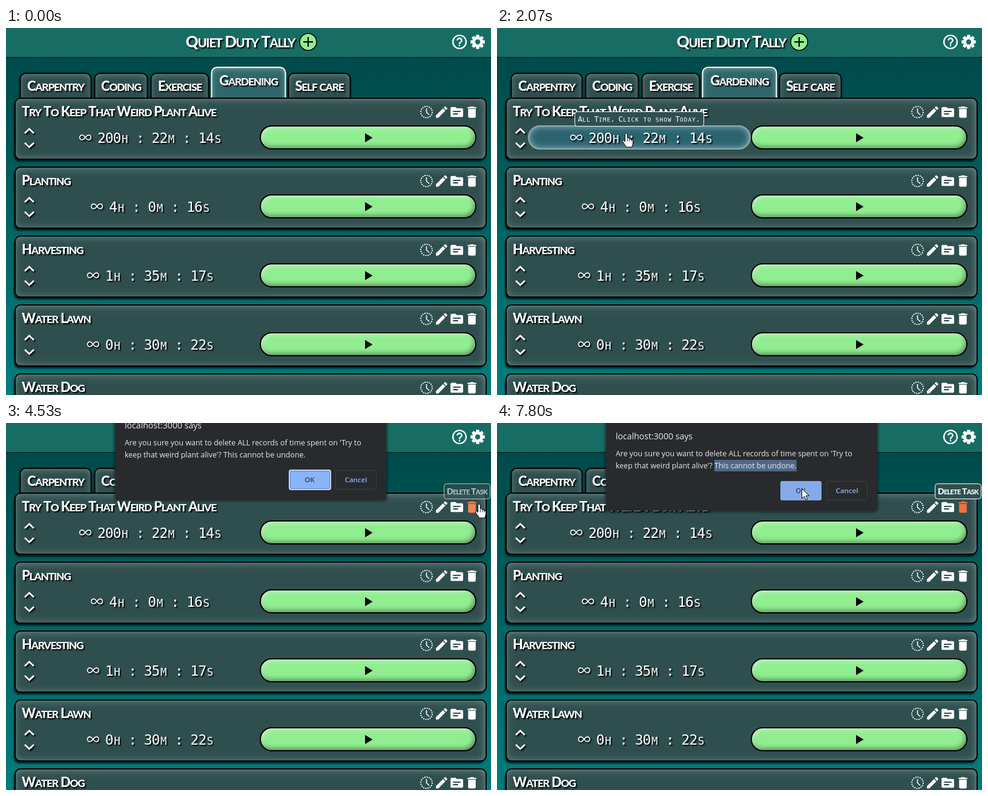
Write an HTML page with a canvas that moves like this. It is 801 px wide and 607 px high and loops after 8000 ms.

```html
<!DOCTYPE html>
<html lang="en">
<head>
<meta charset="utf-8">
<title>Task list</title>
<style>
html, body { margin: 0; width: 100%; height: 100%; overflow: hidden; background: #005c5c; }
canvas { display: block; }
</style>
</head>
<body>
<canvas id="stage" width="801" height="607"></canvas>
<script>
const ctx = document.getElementById('stage').getContext('2d');
const LOOP = 8000, STEP = 1000 / 15;
const SLATE = '#2f4f4f', GREEN = '#90ee90';
const SANS = '"Open Sans", "Noto Sans", sans-serif';

const tabs = [
  ['Carpentry', 22, 120], ['Coding', 145, 90], ['Exercise', 238, 98],
  ['Gardening', 338, 125], ['Self care', 465, 105]
];
const tasks = [
  ['Try To Keep That Weird Plant Alive', '200h : 22m : 14s'],
  ['Planting', '4h : 0m : 16s'],
  ['Harvesting', '1h : 35m : 17s'],
  ['Water Lawn', '0h : 30m : 22s'],
  ['Water Dog', '']
];

// Icons on a 24 unit grid
const icons = {
  help: new Path2D('M11 18h2v-2h-2v2zM12 2C6.48 2 2 6.48 2 12s4.48 10 10 10 10-4.48 10-10S17.52 2 12 2zm0 18c-4.41 0-8-3.59-8-8s3.59-8 8-8 8 3.59 8 8-3.59 8-8 8zm0-14c-2.21 0-4 1.79-4 4h2c0-1.1.9-2 2-2s2 .9 2 2c0 2-3 1.75-3 5h2c0-2.25 3-2.5 3-5 0-2.21-1.79-4-4-4z'),
  pencil: new Path2D('M3 17.25V21h3.75L17.81 9.94l-3.75-3.75L3 17.25zM20.71 7.04c.39-.39.39-1.02 0-1.41l-2.34-2.34c-.39-.39-1.02-.39-1.41 0l-1.83 1.83 3.75 3.75 1.83-1.83z'),
  folder: new Path2D('M20 6h-8l-2-2H4c-1.1 0-2 .9-2 2v12c0 1.1.9 2 2 2h16c1.1 0 2-.9 2-2V8c0-1.1-.9-2-2-2zM14 16H6v-2h8zM18 12H6v-2h12z'),
  trash: new Path2D('M6 19c0 1.1.9 2 2 2h8c1.1 0 2-.9 2-2V7H6v12zM19 4h-3.5l-1-1h-5l-1 1H5v2h14V4z')
};

const arrow = new Path2D('M0 0V16.5L4 12.8 6.6 18.6 9.2 17.5 6.7 11.8H12Z');
const hand = new Path2D('M-2 1.5C-2-.6 1.8-.6 1.8 1.5V7.5C4.2 6.6 5.5 7.6 5.5 9 7 8.4 8.4 9 8.5 10.3 10 10 11 11 11 12.5V16C11 18.5 9.5 19.5 9.5 22.5H-.5C-.5 20-2.5 18.5-4 16.5L-6 13C-6.5 11.3-4.5 10.6-3.4 12L-2 13.5Z');

// Pointer path: time, x, y and, where it changes, the shape
const track = [
  [130, 762, 478, 'arrow'], [470, 470, 345], [530, 400, 312, 'hand'],
  [660, 260, 268, 'arrow'], [800, 198.5, 219], [930, 207, 200], [1000, 228, 185, 'hand'],
  [1400, 430, 176], [1666, 408, 164], [2000, 408, 164], [2066, 213, 174],
  [2133, 202, 184], [2266, 220, 178], [2533, 220, 178], [2733, 392, 164],
  [2800, 392, 164], [3200, 600, 180], [3666, 730, 143], [3733, 758, 139],
  [3800, 783, 140, 'arrow'], [4070, 786, 405], [4400, 781, 134, 'hand'],
  [4866, 781, 134], [4933, 778, 138, 'arrow'], [5450, 330, 84, 'beam'], [5666, 269, 74],
  [5800, 269, 74], [5866, 274, 73], [6333, 361, 72], [6400, 361, 72],
  [7266, 500, 66], [7333, 500, 66], [7533, 502, 84, 'arrow'], [7800, 503, 108]
];

const clamp = v => Math.max(0, Math.min(1, v));
const pulse = (t, on, off, len) => clamp((t - on) / len) - clamp((t - off) / len);

function mix(a, b, p) {
  return `rgb(${a.map((v, i) => Math.round(v + (b[i] - v) * p))})`;
}

function shade(dx, dy, blur, color) {
  ctx.shadowOffsetX = dx;
  ctx.shadowOffsetY = dy;
  ctx.shadowBlur = blur;
  ctx.shadowColor = color;
}

function scoped(draw) {
  ctx.save();
  draw();
  ctx.restore();
}

function box(x, y, w, h, r, fill, line, width = 1) {
  ctx.beginPath();
  ctx.roundRect(x, y, w, h, r);
  if (fill) { ctx.fillStyle = fill; ctx.fill(); }
  if (line) { ctx.strokeStyle = line; ctx.lineWidth = width; ctx.stroke(); }
}

function inset(x, y, w, h, r, dx, dy, blur, color) {
  scoped(() => {
    ctx.beginPath();
    ctx.roundRect(x, y, w, h, r);
    ctx.clip();
    shade(dx, dy, blur, color);
    ctx.beginPath();
    ctx.rect(x - 40, y - 40, w + 80, h + 80);
    ctx.roundRect(x, y, w, h, r);
    ctx.fillStyle = '#000';
    ctx.fill('evenodd');
  });
}

function text(s, x, y, font, color, align = 'left') {
  ctx.font = font;
  ctx.fillStyle = color;
  ctx.textAlign = align;
  ctx.fillText(s, x, y);
}

// Small capitals; align 0 is left, .5 is centre
function caps(s, x, y, size, align = 0) {
  scoped(() => {
    ctx.letterSpacing = -size * .055 + 'px';
    const runs = s.match(/[a-z]+|[^a-z]+/g).map(run => {
      const font = `800 ${/[a-z]/.test(run) ? size * .79 : size}px Lato, sans-serif`;
      ctx.font = font;
      const up = run.toUpperCase();
      return [up, font, ctx.measureText(up).width];
    });
    x -= align * runs.reduce((sum, r) => sum + r[2], 0);
    for (const [run, font, w] of runs) {
      text(run, x, y, font, '#fff');
      x += w;
    }
  });
}

function mono(s, x, y, size, pitch) {
  [...s].forEach((c, i) => {
    const px = /[a-z]/.test(c) ? size * .76 : size;
    text(c.toUpperCase(), x + (i + .5) * pitch, y, `${px}px "DejaVu Sans Mono", monospace`, '#fff', 'center');
  });
}

function icon(name, cx, cy, size, color = '#fff') {
  scoped(() => {
    ctx.translate(cx - size / 2, cy - size / 2);
    ctx.scale(size / 24, size / 24);
    ctx.fillStyle = color;
    ctx.fill(icons[name], 'evenodd');
  });
}

function line(points, color, width) {
  ctx.beginPath();
  points.forEach(([x, y]) => ctx.lineTo(x, y));
  ctx.strokeStyle = color;
  ctx.lineWidth = width;
  ctx.stroke();
}

function clock(x, y) {
  scoped(() => {
    ctx.strokeStyle = '#fff';
    ctx.lineWidth = 1.8;
    for (let i = 0; i < 16; i++) {
      const a = i * Math.PI / 8;
      ctx.beginPath();
      ctx.arc(x, y, 9.4, a, a + .22);
      ctx.stroke();
    }
    line([[x, y - 6], [x, y + .5], [x + 4.5, y + 4.5]], '#fff', 1.6);
  });
}

function gear(x, y) {
  ctx.beginPath();
  for (let i = 0; i < 8; i++) {
    const a = i * Math.PI / 4;
    for (const [r, d] of [[8.6, -.36], [12, -.2], [12, .2], [8.6, .36]])
      ctx.lineTo(x + r * Math.cos(a + d), y + r * Math.sin(a + d));
  }
  ctx.closePath();
  ctx.moveTo(x + 4.2, y);
  ctx.arc(x, y, 4.2, 0, 7);
  ctx.fillStyle = '#fff';
  ctx.fill('evenodd');
}

function infinity(x, y) {
  const pts = [];
  for (let i = 0; i <= 60; i++) {
    const a = i * Math.PI / 30, k = 9.3 / (1 + Math.sin(a) ** 2);
    pts.push([x + k * Math.cos(a), y + 1.2 * k * Math.sin(a) * Math.cos(a)]);
  }
  line(pts, '#fff', 1.6);
}

function header() {
  const sky = ctx.createLinearGradient(0, 48, 0, 607);
  sky.addColorStop(0, '#004a4a');
  sky.addColorStop(1, '#007d7d');
  ctx.fillStyle = sky;
  ctx.fillRect(0, 0, 801, 607);
  ctx.fillStyle = '#176d64';
  ctx.fillRect(0, 0, 801, 48);
  ctx.fillStyle = '#001a1a';
  ctx.fillRect(0, 48, 801, 1);
  scoped(() => {
    shade(2, 2, 2, '#000');
    caps('Quiet Duty Tally', 387, 32, 26, .5);
  });
  box(485, 9, 28, 28, 14, GREEN, '#000', 1.5);
  line([[491, 23], [507, 23]], '#000', 2.2);
  line([[499, 15], [499, 31]], '#000', 2.2);
  icon('help', 749, 23, 29);
  gear(779, 23);
}

function tab([name, x, w]) {
  const on = name === 'Gardening';
  const y = on ? 65 : 75, r = [9, 9, 0, 0];
  const left = x + 1.5, wide = w - 3;
  scoped(() => {
    shade(0, 1, 4, 'rgba(0,0,0,.7)');
    box(left, y, wide, 50, r, on ? '#2f676b' : SLATE);
  });
  inset(left, y, wide, 60, r, 0, 2, 10, on ? 'rgba(255,255,255,.4)' : 'rgba(255,255,255,.32)');
  box(left, y, wide, 60, r, null, on ? '#fff' : '#000', 2);
  scoped(() => {
    shade(2, 2, 2, '#000');
    caps(name, x + w / 2, on ? 95 : 104, 22, .5);
  });
}

function timerGlow(y, p) {
  if (p <= 0) return;
  scoped(() => {
    ctx.globalAlpha = p;
    box(52, y, 366, 38, 19, '#2a6470');
    inset(52, y, 366, 38, 19, 0, 0, 12, 'rgba(255,255,255,.6)');
    box(52, y, 366, 38, 19, null, '#8fabb0', 2);
  });
}

function card([title, time], i, t) {
  const y = 115 + i * 114;
  scoped(() => {
    shade(-2, 4, 3, 'rgba(0,0,0,.75)');
    box(15, y + 1, 778, 101, 9, SLATE);
  });
  inset(15, y + 1, 778, 101, 9, -1, 1, 13, 'rgba(255,255,255,.36)');
  box(15, y + 1, 778, 101, 9, null, '#000', 2);

  if (i === 0) timerGlow(y + 47, pulse(t, 930, 2860, 130));
  if (i === 1) timerGlow(y + 47, pulse(t, 500, 640, 130));

  scoped(() => {
    shade(2, 2, 2, '#000');
    caps(title, 26, y + 31, 22);
    line([[31, y + 59], [38.5, y + 52], [46, y + 59]], '#fff', 2.8);
    line([[31, y + 75], [38.5, y + 82], [46, y + 75]], '#fff', 2.8);
    const x = 151.5 + (16 - time.length) * 6.4;
    mono(time, x, y + 74.5, 23, 12.8);
    infinity(x - 20.5, y + 66);
  });

  const first = i === 0;
  const cream = first ? pulse(t, 3680, 3745, 300) : 0;
  const red = first ? pulse(t, 3733, 3800, 300) + pulse(t, 4360, LOOP * 2, 200) : 0;
  clock(694.5, y + 24);
  icon('pencil', 719.5, y + 24, 25);
  icon('folder', 744.5, y + 24, 25, mix([255, 255, 255], [240, 220, 110], cream));
  icon('trash', 769.5, y + 24, 25, mix([255, 255, 255], [240, 112, 62], red));

  box(420, y + 47, 356, 38, 19, GREEN);
  inset(420, y + 47, 356, 38, 19, -2, -3, 8, 'rgba(0,0,0,.5)');
  inset(420, y + 47, 356, 38, 19, 2, 3, 7, 'rgba(255,255,255,.6)');
  box(420, y + 47, 356, 38, 19, null, '#000', 2);
  ctx.beginPath();
  ctx.moveTo(593, y + 59);
  ctx.lineTo(605.5, y + 66.5);
  ctx.lineTo(593, y + 74);
  ctx.fillStyle = '#000';
  ctx.fill();
}

function tips(t) {
  scoped(() => {
    ctx.globalAlpha = pulse(t, 1000, 2860, 130);
    box(128.5, 138.5, 213, 24, 4, SLATE, '#fff');
    mono('All Time. Click to show Today.', 134, 155, 12.4, 6.7);
  });
  scoped(() => {
    ctx.globalAlpha = pulse(t, 4400, LOOP * 2, 200);
    box(723.5, 100.5, 76, 25, 4, SLATE, '#fff');
    caps('Delete Task', 761.5, 118, 14, .5);
  });
}

function dialog(t, pointer) {
  if (t < 4530) return;
  const font = `12.4px ${SANS}`;
  const lead = "keep that weird plant alive'? ", last = 'This cannot be undone.';
  const dragging = t >= 6460;
  scoped(() => {
    ctx.translate(0, -18 * (1 - clamp((t - 4533) / 200)) ** 2);
    scoped(() => {
      shade(0, 1, 6, 'rgba(0,0,0,.7)');
      box(180, -20, 448, 165, 4, '#292a2d');
    });
    text('localhost:3000 says', 196, 26.5, `14.1px ${SANS}`, '#e8eaed');
    text("Are you sure you want to delete ALL records of time spent on 'Try to", 196, 54.5, font, '#e8eaed');
    if (dragging) {
      const x = 196 + ctx.measureText(lead).width;
      let w = 0;
      for (let n = 1; n <= last.length; n++) {
        const next = ctx.measureText(last.slice(0, n)).width;
        if (t < 7260 && x + (w + next) / 2 > pointer.x) break;
        w = next;
      }
      ctx.fillStyle = '#4f6888';
      ctx.fillRect(x, 61, w, 19);
    }
    text(lead + last, 196, 74.5, font, '#e8eaed');

    const over = t > 7600;
    box(468, 96, 68, 32, 3, over ? '#84aae9' : '#8ab4f8');
    if (!dragging) {
      box(469.5, 97.5, 65, 29, 2, null, '#5c86c8');
      box(468, 96, 68, 32, 3, null, '#c4d9fb', 2);
    }
    text('OK', 501.5, 116, `600 11.5px ${SANS}`, '#2b4263', 'center');
    box(544.5, 96.5, 67, 31, 3, null, '#3c4043');
    text('Cancel', 578, 116, `600 11.5px ${SANS}`, '#8ab4f8', 'center');
  });
}

function pointerAt(t) {
  if (t < track[0][0]) return null;
  let i = 0, kind = 'arrow';
  while (i < track.length && track[i][0] <= t) kind = track[i++][3] || kind;
  const a = track[i - 1], b = track[i] || a;
  const p = b === a ? 0 : (t - a[0]) / (b[0] - a[0]);
  return { x: a[1] + (b[1] - a[1]) * p, y: a[2] + (b[2] - a[2]) * p, kind };
}

function drawPointer({ x, y, kind }) {
  scoped(() => {
    ctx.translate(Math.round(x) + .5, Math.round(y) + .5);
    if (kind === 'beam') {
      line([[0, -7], [0, 7]], '#fff', 1);
      for (const end of [-7.5, 7.5]) line([[-3.5, end], [3.5, end]], '#fff', 1);
      return;
    }
    const shape = kind === 'hand' ? hand : arrow;
    ctx.fillStyle = '#fff';
    ctx.fill(shape);
    ctx.strokeStyle = '#000';
    ctx.lineWidth = 1;
    ctx.stroke(shape);
    if (kind === 'hand')
      for (const fx of [1.8, 5.3, 8.4]) line([[fx, 8], [fx, 13]], '#000', .9);
  });
}

function render(t) {
  const pointer = pointerAt(t);
  header();
  tabs.forEach(tab);
  tasks.forEach((task, i) => card(task, i, t));
  tips(t);
  dialog(t, pointer);
  if (pointer) drawPointer(pointer);
}

const start = performance.now();
let shown = -1;
function tick() {
  const t = (performance.now() - start) % LOOP;
  const step = Math.floor((t + 4) / STEP);
  if (step !== shown) {
    shown = step;
    render(step * STEP);
  }
  requestAnimationFrame(tick);
}
tick();
</script>
</body>
</html>
```
